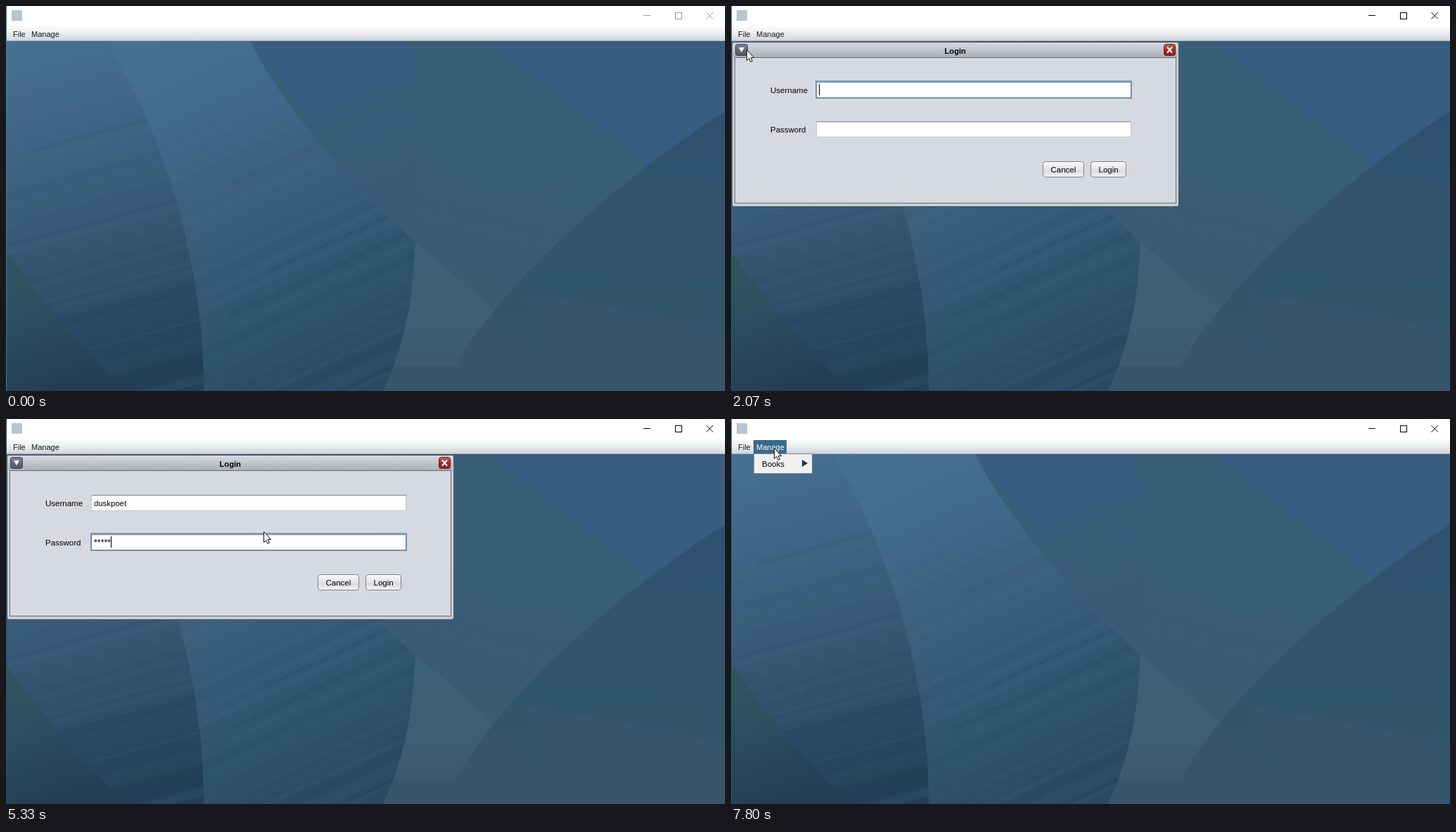
An HTML page for the animation above (8 s loop, 1022x548 px).

```html
<!DOCTYPE html>
<html lang="en">
<head>
<meta charset="utf-8">
<title>Login demo</title>
<style>
html, body { margin: 0; width: 100%; height: 100%; overflow: hidden; background: #fff; }
svg { display: block; width: 100%; height: 100%; }
text { font: 11.5px "Liberation Sans", Arial, sans-serif; fill: #000; white-space: pre; }
.bar text { font-size: 11px; fill: #1c1c1c; }
.bold { font-weight: bold; font-size: 11.2px; }
.sharp { shape-rendering: crispEdges; }
.bar .lit text, .lit text { fill: #fff; }
.mark { fill: none; }
.lit > .mark { fill: #39698a; }
.popup { fill: #eff0f2; stroke: #7b848e; }
.ring { fill: none; stroke: none; }
.focus .ring { stroke: #73a0c6; stroke-width: 2; }
.focus .box { stroke: #64839f; }
.box { fill: #fff; stroke: #c3c6cb; }
.button rect { fill: url(#raised); stroke: #7d828b; }
.button.hover rect { fill: url(#hovered); }
.button.pressed rect { fill: url(#sunken); stroke: #2d405b; }
.button.pressed .ring { fill: none; stroke: #73a0c6; stroke-width: 2; }
.button .ring { fill: none; stroke: none; }
</style>
</head>
<body>
<svg viewBox="0 0 1022 548" preserveAspectRatio="none">
<defs>
  <linearGradient id="left" gradientUnits="userSpaceOnUse" x1="40" y1="50" x2="170" y2="535">
    <stop stop-color="#457092"/><stop offset=".22" stop-color="#426789"/><stop offset=".45" stop-color="#3a5d7a"/>
    <stop offset=".65" stop-color="#33546e"/><stop offset=".82" stop-color="#294b66"/><stop offset="1" stop-color="#223f57"/>
  </linearGradient>
  <linearGradient id="band" gradientUnits="userSpaceOnUse" x1="220" y1="50" x2="440" y2="535">
    <stop stop-color="#467092"/><stop offset=".22" stop-color="#426a8d"/><stop offset=".42" stop-color="#3c607e"/>
    <stop offset=".65" stop-color="#365a75"/><stop offset=".85" stop-color="#2f526b"/><stop offset="1" stop-color="#2a4963"/>
  </linearGradient>
  <linearGradient id="corner" x2=".3" y2="1">
    <stop stop-color="#31555f"/><stop offset=".5" stop-color="#2c4d60"/><stop offset="1" stop-color="#233f56"/>
  </linearGradient>
  <linearGradient id="middle" gradientUnits="userSpaceOnUse" x1="700" y1="50" x2="600" y2="460">
    <stop stop-color="#395f78"/><stop offset=".4" stop-color="#395e77"/><stop offset=".58" stop-color="#3a5b76"/><stop offset="1" stop-color="#3c5b71"/>
  </linearGradient>
  <linearGradient id="inner" gradientUnits="userSpaceOnUse" x1="430" y1="50" x2="520" y2="260">
    <stop stop-color="#385d80"/><stop offset=".42" stop-color="#385d7f"/><stop offset=".56" stop-color="#395e78"/><stop offset="1" stop-color="#395b76"/>
  </linearGradient>
  <linearGradient id="wedge" x2="0" y2="1">
    <stop stop-color="#3d6179"/><stop offset=".5" stop-color="#3d5f75"/><stop offset=".8" stop-color="#3c5a70"/><stop offset="1" stop-color="#3a5a72"/>
  </linearGradient>
  <linearGradient id="dark" gradientUnits="userSpaceOnUse" x1="900" y1="150" x2="880" y2="548">
    <stop stop-color="#2f5170"/><stop offset=".22" stop-color="#30536f"/><stop offset=".28" stop-color="#34536d"/>
    <stop offset=".46" stop-color="#34536e"/><stop offset=".6" stop-color="#31556c"/><stop offset="1" stop-color="#34566c"/>
  </linearGradient>
  <linearGradient id="menubar" x2="0" y2="1">
    <stop stop-color="#fcfcfc"/><stop offset=".45" stop-color="#eceeef"/><stop offset="1" stop-color="#d3d6da"/>
  </linearGradient>
  <linearGradient id="caption" x2="0" y2="1"><stop stop-color="#d5d8de"/><stop offset="1" stop-color="#a9aeb9"/></linearGradient>
  <linearGradient id="raised" x2="0" y2="1">
    <stop stop-color="#fafafb"/><stop offset=".5" stop-color="#e3e5e9"/><stop offset=".6" stop-color="#d9dce1"/><stop offset="1" stop-color="#f3f4f6"/>
  </linearGradient>
  <linearGradient id="hovered" x2="0" y2="1">
    <stop stop-color="#fff"/><stop offset=".5" stop-color="#f0f1f4"/><stop offset=".6" stop-color="#e6e8ec"/><stop offset="1" stop-color="#fff"/>
  </linearGradient>
  <linearGradient id="sunken" x2="0" y2="1"><stop stop-color="#8f99ab"/><stop offset=".5" stop-color="#a5aebd"/><stop offset="1" stop-color="#c0c8d4"/></linearGradient>
  <linearGradient id="red" x2="0" y2="1"><stop stop-color="#c3665c"/><stop offset=".5" stop-color="#a8281d"/><stop offset="1" stop-color="#94241b"/></linearGradient>
  <linearGradient id="slate" x2="0" y2="1"><stop stop-color="#7c8492"/><stop offset="1" stop-color="#4b5463"/></linearGradient>
  <path id="leftShape" d="M0 50H143C200 140 282 330 281 548H0Z"/>
  <path id="bandShape" d="M143 50H347C390 140 500 262 582 336C578 400 575 462 536 548H281C282 330 200 140 143 50Z"/>
  <clipPath id="leftClip"><use href="#leftShape"/></clipPath>
  <clipPath id="bandClip"><use href="#bandShape"/></clipPath>
</defs>

<!-- wallpaper -->
<path fill="url(#middle)" d="M0 50H1022V548H0Z"/>
<path fill="#395d80" d="M685 50H1022V200L925 240 890 207Z"/>
<path fill="url(#inner)" d="M340 50H576Q592 130 587 240L583 340Z"/>
<path fill="url(#wedge)" d="M582 336L770 497 700 548H530Z"/>
<path fill="url(#dark)" d="M1022 150C860 255 700 400 640 512H540V548H1022Z"/>
<path fill="#38566b" d="M735 410Q880 430 1022 465V548H530L548 512H640Q668 465 690 442L770 497Z"/>
<use href="#bandShape" fill="url(#band)"/>
<g clip-path="url(#bandClip)"><g id="bandStreaks" transform="rotate(-25 400 300)"/></g>
<use href="#leftShape" fill="url(#left)"/>
<g clip-path="url(#leftClip)"><g id="leftStreaks" transform="rotate(-15 130 300)"/></g>
<path fill="url(#corner)" d="M0 349Q75 455 170 548H0Z"/>

<!-- window frame -->
<path fill="#fff" d="M0 0H1022V29H0Z"/>
<path fill="url(#menubar)" d="M0 29H1022V49H0Z"/>
<path fill="#a9b0b8" d="M0 49H1022V50H0Z"/>
<path fill="#b9c4ce" d="M8 6H23V21H8Z"/>
<g id="controls" fill="none">
  <path class="sharp" d="M906 13.5H916M951.5 9.5H960.5V18.5H951.5Z"/>
  <path d="M995.5 9L1005 18.5M1005 9L995.5 18.5"/>
</g>
<path id="edge" d="M0 0H1V548H0Z"/>

<g class="bar">
  <g id="file"><path class="mark" d="M6 30H32V49H6Z"/><text x="10" y="44">File</text></g>
  <g id="manage"><path class="mark" d="M32 30H79V49H32Z"/><text x="36" y="44">Manage</text></g>
</g>

<g id="fileMenu">
  <path class="popup sharp" d="M6.5 49.5H63.5V113.5H6.5Z"/>
  <g id="loginItem"><path class="mark" d="M7 54H63V72H7Z"/><text x="19" y="67.5">login...</text></g>
  <text x="19" y="86">logout</text><text x="19" y="104">exit</text>
</g>
<g id="manageMenu">
  <path class="popup sharp" d="M32.5 49.5H115.5V77.5H32.5Z"/>
  <text x="44" y="67.5">Books</text><path fill="#303236" d="M101 58L109 63 101 68Z"/>
</g>

<g id="dialog">
  <path fill="url(#caption)" stroke="#4b525e" d="M1.5 285V54.5Q1.5 51.5 4.5 51.5H633.5Q636.5 51.5 636.5 54.5V282.5Q636.5 285.5 633.5 285.5H4.5Q1.5 285.5 1.5 282.5Z"/>
  <path fill="#c9cdd5" d="M2 73H636V282Q636 285 633 285H5Q2 285 2 282Z"/>
  <path fill="url(#caption)" d="M3 53H635V73H3Z"/>
  <path class="sharp" fill="#d6d9df" stroke="#686e78" d="M5.5 73.5H632.5V280.5H5.5Z"/>
  <text class="bold" x="303.5" y="67.5">Login</text>
  <rect x="6.5" y="54.5" width="17" height="16" rx="3" fill="url(#slate)" stroke="#3c4450"/>
  <path fill="#fff" d="M11 59H19L15 66Z"/>
  <rect x="615.5" y="54.5" width="16" height="16" rx="3" fill="url(#red)" stroke="#6d1d17"/>
  <path stroke="#fff" stroke-width="2" d="M620 58.5L627 66.5M627 58.5L620 66.5"/>
  <text x="56" y="124">Username</text><text x="56" y="179.5">Password</text>
  <g id="userField">
    <path class="ring" d="M121 107H569V131H121Z"/><path class="box sharp" d="M121.5 108.5H568.5V130.5H121.5Z"/>
    <path fill="#9298a0" d="M122 108H569V109H122Z"/><path fill="#dcdee1" d="M122 109H568V110H122Z"/>
    <text x="125" y="124" style="font-size:11.35px"></text>
  </g>
  <g id="passField">
    <path class="ring" d="M121 163H569V187H121Z"/><path class="box sharp" d="M121.5 164.5H568.5V186.5H121.5Z"/>
    <path fill="#9298a0" d="M122 164H569V165H122Z"/><path fill="#dcdee1" d="M122 165H568V166H122Z"/>
    <text x="125" y="180" style="font-size:12.4px"></text>
  </g>
  <rect id="caret" width="1" height="16"/>
  <g class="button"><rect x="443.5" y="221.5" width="58" height="22" rx="4"/><text x="454.5" y="237">Cancel</text></g>
  <g id="loginButton" class="button">
    <rect class="ring" x="510.5" y="220.5" width="52" height="24" rx="5"/>
    <rect x="511.5" y="221.5" width="50" height="22" rx="4"/><text x="522.5" y="237">Login</text>
  </g>
</g>
<path id="cursor" fill="#fff" stroke="#111" d="M.5 .5V15.5L3.8 12.4 6 17.5 8.4 16.5 6.2 11.5H10.7Z"/>
</svg>

<script>
const LOOP = 8000, TICK = 200 / 3;
const $ = id => document.getElementById(id);
const show = (id, on) => $(id).setAttribute('visibility', on ? 'visible' : 'hidden');
const flag = (id, name, on) => $(id).classList.toggle(name, on);

const userName = 'duskpoet';
const userKeys = [2800, 3200, 3400, 3530, 3930, 4130, 4400, 4400];
const passKeys = [4930, 5070, 5200, 5270, 5330];

// time, x, y of the pointer's tip
const path = [
  [0, 1100, 560], [70, 1008, 532], [130, 520, 420], [200, 64, 323], [330, 64, 323],
  [1000, 15, 37], [1330, 15, 37], [1800, 20, 68], [1930, 22, 62], [2270, 22, 62],
  [2330, 240, 122], [2400, 366, 160], [5870, 366, 160], [6400, 518, 226],
  [6800, 518, 226], [6870, 173, 50], [6930, -40, -60], [7130, -40, -60],
  [7200, 10, 20], [7670, 61, 41], [LOOP, 61, 41]
];

function pointer(t) {
  const i = path.findIndex(p => p[0] > t);
  const [t0, x0, y0] = path[i - 1], [t1, x1, y1] = path[i];
  const u = (t - t0) / (t1 - t0), e = u * u * (3 - 2 * u);
  return [Math.round(x0 + (x1 - x0) * e), Math.round(y0 + (y1 - y0) * e)];
}

function addStreaks(id, x, width, seed) {
  const random = () => (seed = seed * 16807 % 2147483647) / 2147483647;
  for (let i = 0; i < 34; i++) {
    const r = document.createElementNS('http://www.w3.org/2000/svg', 'rect');
    const values = {
      x: x + random() * width * .5, y: 130 + random() * 430, width, height: 2 + random() * 11,
      fill: random() < .5 ? '#16344f' : '#568099', opacity: .03 + random() * .05
    };
    for (const k in values) r.setAttribute(k, values[k]);
    $(id).append(r);
  }
}

function draw(t) {
  const typed = keys => keys.filter(k => k <= t).length;
  const [x, y] = pointer(t);
  const during = (a, b) => t >= a && t < b;

  const active = t >= 1130;
  $('controls').setAttribute('stroke', active ? '#000' : '#999');
  $('edge').setAttribute('fill', active ? '#1f5568' : '#2c8bab');

  const fileOpen = during(1200, 2070), manageOpen = t >= 7800;
  show('fileMenu', fileOpen);
  flag('file', 'lit', fileOpen);
  flag('loginItem', 'lit', fileOpen && y >= 54);
  show('manageMenu', manageOpen);
  flag('manage', 'lit', manageOpen);

  const open = during(2070, 6600), pressed = during(6470, 6600), onPassword = t >= 4670;
  $('dialog').style.display = open ? '' : 'none';
  if (open) {
    const field = onPassword ? 'passField' : 'userField';
    const userText = $('userField').lastElementChild, passText = $('passField').lastElementChild;
    userText.textContent = userName.slice(0, typed(userKeys));
    passText.textContent = '*'.repeat(typed(passKeys));
    flag('userField', 'focus', !onPassword);
    flag('passField', 'focus', onPassword && !pressed);
    const width = $(field).lastElementChild.getComputedTextLength();
    $('caret').setAttribute('x', 125 + Math.round(width));
    $('caret').setAttribute('y', onPassword ? 167 : 111);
    $('caret').style.display = during(2600, 2800) || during(5870, 6400) || pressed ? 'none' : '';
    flag('loginButton', 'hover', x > 511 && y > 221);
    flag('loginButton', 'pressed', pressed);
  }
  $('cursor').setAttribute('transform', `translate(${x} ${y})`);
}

addStreaks('leftStreaks', -160, 500, 7);
addStreaks('bandStreaks', 60, 600, 23);

const start = performance.now();
function frame() {
  const t = (performance.now() - start) % LOOP;
  draw(Math.min(LOOP - 1, Math.round(Math.floor(t / TICK + .06) * TICK / 10) * 10));
  requestAnimationFrame(frame);
}
frame();
</script>
</body>
</html>
```
